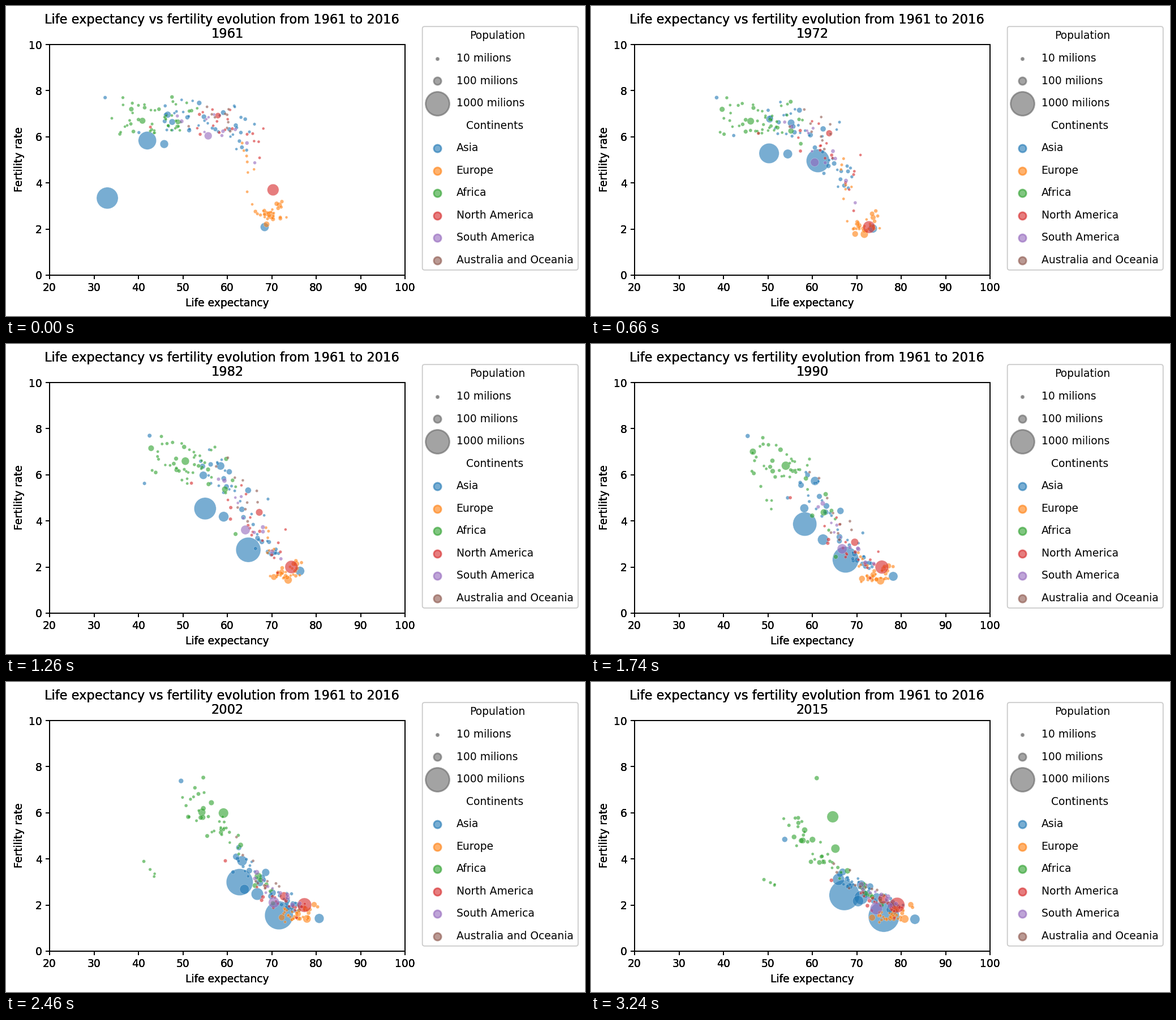
Animation of 1023 by 547 pixels, one loop 3.3 s. Source, as a matplotlib script:

```python
import numpy as np
import matplotlib.pyplot as plt
from matplotlib.animation import FuncAnimation
from matplotlib.patches import FancyBboxPatch

W, H, DPI = 1023, 547, 128
PX = 72 / DPI                 # points per pixel
K = 135 / DPI                 # scale of the default text and line sizes
FRAMES = 55
ASIA, EUROPE, AFRICA, NORTH, SOUTH, OCEANIA = (
    "#1f77b4", "#ff7f0e", "#2ca02c", "#d62728", "#9467bd", "#8c564b")
CONTINENTS = {"Asia": ASIA, "Europe": EUROPE, "Africa": AFRICA,
              "North America": NORTH, "South America": SOUTH,
              "Australia and Oceania": OCEANIA}

plt.rcParams.update({
    "font.family": "DejaVu Sans", "font.size": 10 * K,
    "axes.linewidth": 0.8 * K,
    "xtick.major.size": 3.5 * K, "ytick.major.size": 3.5 * K,
    "xtick.major.width": 0.8 * K, "ytick.major.width": 0.8 * K,
    "xtick.major.pad": 3.5 * K, "ytick.major.pad": 3.5 * K,
})

rng = np.random.default_rng(7)
t = np.arange(FRAMES)
s = t / (FRAMES - 1)
countries = []


def country(color, pop, life, fert, mid, width, bend=0.8, shocks=()):
    """Life expectancy eases up while fertility falls along a logistic curve.

    A shock (step, life drop, duration, fertility drop) fades on both sides.
    """
    people = pop[0] * (pop[1] / pop[0]) ** s
    years = life[0] + (life[1] - life[0]) * s ** bend
    births = fert[1] + (fert[0] - fert[1]) / (1 + np.exp((t - mid) / width))
    for step, life_drop, duration, fert_drop in shocks:
        fade = np.exp(-np.abs(t - step) / duration)
        years = years - life_drop * fade
        births = births - fert_drop * fade
    countries.append((color, people, years, births))


def region(color, count, top, growth, life0, life1, fert0, fert1, mid,
           shocks=()):
    """Smaller countries; each range runs from least to most developed."""
    for _ in range(count):
        level = rng.random()

        def pick(span, noise):
            return span[0] + (span[1] - span[0]) * level + rng.normal(0, noise)

        pop = np.exp(rng.uniform(np.log(0.4), np.log(top)))
        country(color, (pop, pop * growth), (pick(life0, 1.6), pick(life1, 1)),
                (rng.uniform(*fert0), pick(fert1, 0.15)), pick(mid, 2.5),
                rng.uniform(5.5, 8), rng.uniform(0.7, 1.1), shocks)


country(ASIA, (660, 1371), (57.5, 76.1), (6.6, 1.5), 14.7, 5, 1,
        [(0, 24.5, 1.5, 3), (28, 0, 4, -0.7)])
country(ASIA, (459, 1310), (42, 67.2), (6.4, 2.0), 25, 13, 0.7)
country(ASIA, (90, 258), (45.8, 71), (5.8, 2.3), 22, 6.5, 0.67)
country(ASIA, (94, 127), (68.4, 83.1), (2.1, 1.38), 24, 6, 0.65)
country(ASIA, (46, 189), (47.6, 65.9), (6.65, 3.0), 35, 5.5, 0.55)
country(ASIA, (50, 161), (46.6, 70.3), (7.0, 2.1), 29, 6, 1.15)
country(ASIA, (27, 101), (59.1, 71), (7.6, 2.6), 23, 11)
country(ASIA, (9, 34), (32.5, 53.8), (7.7, 3.5), 51, 4)
country(ASIA, (6, 16), (40.2, 68), (6.2, 2.7), 33, 6, 1,
        [(17.5, 31, 3, 0.5)])
country(EUROPE, (73, 82), (69.8, 80.8), (2.8, 1.4), 7, 4, 1.1)
country(AFRICA, (46, 181), (40.9, 64.6), (6.7, 5.8), 33, 6, 0.95)
country(AFRICA, (23, 99), (38.4, 65.2), (7.2, 4.0), 44, 5.5, 1.9)
country(AFRICA, (28, 92), (48.9, 71.4), (6.8, 2.7), 26, 8)
country(AFRICA, (4, 20), (36.5, 61), (7.7, 7.5), 30, 6, 1.1)
country(AFRICA, (2, 7), (36, 58), (6.2, 4.8), 46, 5, 1.2,
        [(37, 12.5, 1.2, 0)])
country(NORTH, (184, 321), (70.3, 79.1), (5.4, 2.0), 0, 3)
country(NORTH, (39, 126), (57.9, 75.9), (7.1, 2.25), 19.5, 6, 0.7)
country(NORTH, (4, 11), (42.7, 64.3), (6.6, 2.5), 34, 11, 0.9,
        [(49, 30, 0.3, 0)])
country(SOUTH, (75, 206), (55.7, 74.4), (7.0, 1.75), 15, 10, 0.85)

region(ASIA, 40, 26, 2.8, (44, 66), (66, 80), (6.2, 7.7), (3.1, 1.8), (38, 8))
region(EUROPE, 29, 50, 1.2, (67.5, 72), (73, 82.5), (2.4, 3.4), (1.4, 1.75),
       (9, 11))
region(EUROPE, 7, 6, 1.3, (62, 66), (75, 79), (3.5, 6.3), (1.5, 1.6), (20, 12))
region(AFRICA, 34, 14, 3.6, (36, 51), (55, 67), (6.1, 7.5), (4.3, 3.0),
       (55, 36))
region(AFRICA, 4, 3, 3, (47, 50), (53, 57), (6.3, 6.9), (2.9, 2.6), (32, 26),
       [(44, 16, 6, 0)])
region(AFRICA, 6, 12, 3, (46, 53), (72, 77), (7.0, 7.8), (2.5, 2.1), (30, 20))
region(NORTH, 18, 7, 2.2, (52, 67), (71, 79), (6.3, 7.6), (2.5, 1.7), (28, 7))
region(SOUTH, 11, 18, 2.5, (50, 66), (71, 78), (6.2, 7.2), (2.7, 2.0), (27, 9))
region(OCEANIA, 10, 2, 2.5, (50, 62), (64, 74), (6.3, 7.6), (3.5, 2.5),
       (36, 16))

# continents in legend order, big circles below small ones
order = list(CONTINENTS.values())
countries.sort(key=lambda c: (order.index(c[0]), -c[1][-1]))
colors = [c[0] for c in countries]
pops, lives, ferts = (np.array([c[k] for c in countries]) for k in (1, 2, 3))
sizes = (46.5 ** 2 * pops / 1000 + 4.6 ** 2) * PX ** 2

fig = plt.figure(figsize=(W / DPI, H / DPI), dpi=DPI, facecolor="white")

# overlay in pixel units, y downwards
panel = fig.add_axes([0, 0, 1, 1])
panel.set(xlim=(0, W), ylim=(H, 0))
panel.axis("off")
pixel = panel.transData


def add_plot():
    ax = fig.add_axes([77 / W, 72 / H, 628 / W, 407 / H], facecolor="none")
    ax.set(xlim=(20, 100), ylim=(0, 10), xticks=range(20, 101, 10),
           yticks=range(0, 11, 2))
    ax.text(391, 530, "Life expectancy", ha="center", transform=pixel)
    ax.text(33.2, 271, "Fertility rate", rotation=90, ha="right",
            va="center", transform=pixel)
    ax.text(381, 31, "Life expectancy vs fertility evolution from 1961 to 2016",
            size=12 * K, ha="center", transform=pixel)
    year = ax.text(391, 56.5, "", size=12 * K, ha="center", transform=pixel)
    return ax, year


# stacked layers give the plot's text its heavy edges
plots, year_labels = zip(*[add_plot() for _ in range(3)])
dots = plots[0].scatter(lives[:, 0], ferts[:, 0], s=sizes[:, 0], c=colors,
                        alpha=0.6, edgecolors="white", linewidths=0.4 * PX)


def legend_row(row, label, color=None, size=50):
    if color:
        panel.scatter([762], [53.4 + 39.53 * row], s=size * K ** 2, c=color,
                      alpha=0.6, edgecolors=color, linewidths=1.5 * K)
    x = 795.5 if color else {"Population": 819, "Continents": 813}[label]
    panel.text(x, 58.5 + 39.53 * row, label)


panel.add_patch(FancyBboxPatch(
    (739.5, 40), 267.5, 422, boxstyle="round,pad=3.8,rounding_size=3.8",
    facecolor="white", edgecolor="#cccccc", linewidth=K))
legend_row(0, "Population")
for row, millions in enumerate((10, 100, 1000), 1):
    legend_row(row, f"{millions} milions", "#666666", millions / 2)
legend_row(4, "Continents")
for row, (name, color) in enumerate(CONTINENTS.items(), 5):
    legend_row(row, name, color)


def update(i):
    dots.set_offsets(np.column_stack([lives[:, i], ferts[:, i]]))
    dots.set_sizes(sizes[:, i])
    for label in year_labels:
        label.set_text(str(1961 + i))
    return [dots, *year_labels]


anim = FuncAnimation(fig, update, frames=FRAMES, interval=60,
                     repeat=True, repeat_delay=0, blit=False)
plt.show()
```
